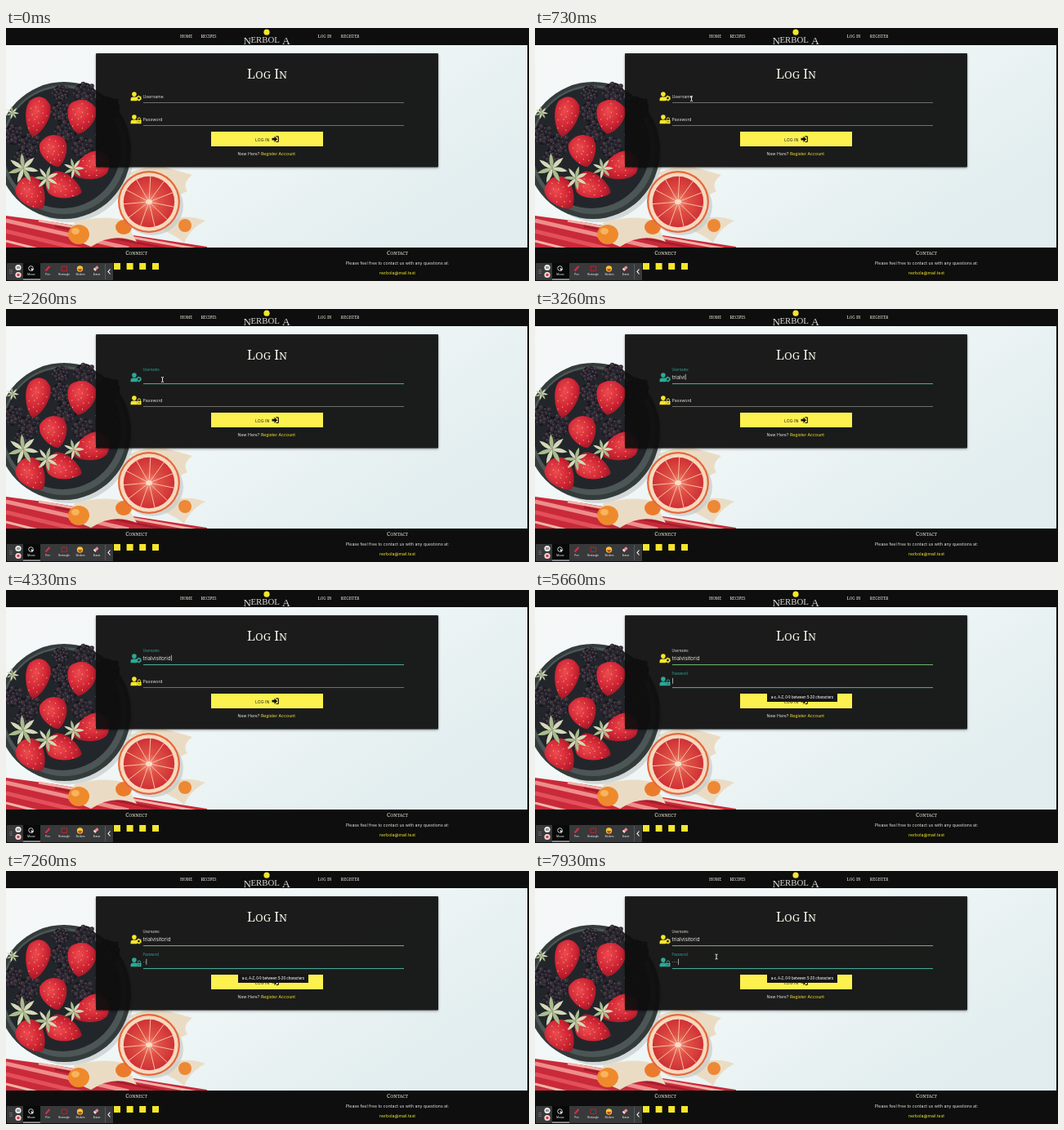
An HTML page that plays this animation: 640x310 px, repeating every 8 s.

```html
<!DOCTYPE html>
<html lang="en">
<head>
<meta charset="utf-8">
<title>Log In</title>
<style>
  html, body { margin: 0; width: 100%; height: 100%; overflow: hidden; background: #0d0e0d; }
  svg { display: block; width: 640px; height: 310px; }
  text { font: 5.2px Inter, sans-serif; fill: #e4e4e2; }
  .caps { font-family: "Noto Serif", serif; fill: #f4f2e6; }
  .logo { font-family: "Liberation Serif", serif; fill: #dcdcd8; }
  .yellow { fill: #f5e62c; }
  .tool { font: 3.1px Roboto, sans-serif; fill: #f2f2f2; }
  .mid { text-anchor: middle; }
</style>
</head>
<body>
<svg id="stage" viewBox="0 0 640 310">
  <defs>
    <linearGradient id="table" x2="1" y2=".6">
      <stop offset="0" stop-color="#f6f8f8"/><stop offset=".5" stop-color="#f0f6f6"/><stop offset="1" stop-color="#e1edef"/>
    </linearGradient>
    <radialGradient id="berryRed" cx=".4" cy=".35" r=".75">
      <stop offset="0" stop-color="#ed4b50"/><stop offset=".55" stop-color="#d02535"/><stop offset="1" stop-color="#8c1422"/>
    </radialGradient>
    <radialGradient id="flesh">
      <stop offset="0" stop-color="#f39a86"/><stop offset=".4" stop-color="#e05145"/><stop offset="1" stop-color="#cf3135"/>
    </radialGradient>
    <filter id="shadow" x="-5%" y="-5%" width="110%" height="115%">
      <feDropShadow dx="0" dy="1" stdDeviation="1.5" flood-opacity=".45"/>
    </filter>
    <clipPath id="photoArea"><path d="M0 21H638V269H0z"/></clipPath>
    <g id="person"><circle cx="4.4" cy="2.8" r="2.8"/><path d="M0 11V9.500Q0 6.300 3 6.300H6Q7 6.300 7.600 6.800V11z"/></g>
    <g id="cog">
      <circle cx="10" cy="7.800" r="2.100" fill="none" stroke="currentColor" stroke-width="1.500"/>
      <circle cx="10" cy="7.800" r="3" fill="none" stroke="currentColor" stroke-width="1" stroke-dasharray="1.570"/>
    </g>
    <g id="lock">
      <rect x="7.700" y="6.400" width="5.300" height="4.600" rx=".6"/>
      <path d="M8.800 6.500V5.200a1.600 1.600 0 0 1 3.200 0V6.500" fill="none" stroke="currentColor"/>
      <circle cx="10.350" cy="8.600" r=".7" fill="#20211f"/>
    </g>
  </defs>

  <g clip-path="url(#photoArea)">
    <rect y="21" width="640" height="248" fill="url(#table)"/>
    <g id="photo"></g>
  </g>
  <path d="M0 0H640V21H0zM0 269H640V310H0zM638.500 21H640V269H638.500z" fill="#0d0e0d"/>
  <rect x="110" y="31" width="419" height="139.500" rx="1" fill="#0c0d0b" fill-opacity=".9" filter="url(#shadow)"/>
  <g id="page"></g>

  <g id="fields"></g>
  <g id="tooltip">
    <rect x="284" y="126.500" width="86" height="10.500" fill="#161617"/>
    <text x="327" y="133.200" class="mid" style="font:4.700px Roboto,sans-serif;fill:#fff">a-z, A-Z, 0-9 between 5-20 characters</text>
  </g>
  <path id="pointer" d="M-1.500-3Q0-3 0-2V2Q0 3-1.500 3M1.500-3Q0-3 0-2M0 2Q0 3 1.500 3" fill="none" stroke="#fff" stroke-width=".9"/>
  <g id="toolbar"></g>
</svg>
<script>
const LOOP = 8000, FOCUS_NAME = 1400, FOCUS_PASS = 4500, TOOLTIP = 5000;
const TEAL = '#2fa896', YELLOW = '#f5e62c';
const $ = id => document.getElementById(id);
const clamp = v => Math.max(0, Math.min(1, v));
const ease = v => 1 - (1 - clamp(v)) ** 3;
const mix = (a, b, k) => a + (b - a) * k;

const ellipse = (x, y, rx, ry, fill, extra = '') =>
  `<ellipse cx="${x}" cy="${y}" rx="${rx}" ry="${ry}" fill="${fill}" ${extra}/>`;
const path = (d, fill, extra = '') => `<path d="${d}" fill="${fill}" ${extra}/>`;
const stroke = (d, color, width) => path(d, 'none', `stroke="${color}" stroke-width="${width}"`);
const text = (x, y, value, cls = '', size = 5.2) =>
  `<text x="${x}" y="${y}" class="${cls}" style="font-size:${size}px">${value}</text>`;

// Capitals with a larger initial on every word
function caps(x, y, value, size) {
  const words = value.split(' ').map(w =>
    `${w[0]}<tspan font-size="${size * .82}">${w.slice(1).toUpperCase()}</tspan>`);
  return text(x, y, words.join(' '), 'caps mid', size);
}

function strawberry(x, y, w, h, turn) {
  let seeds = '';
  for (let i = 0; i < 16; i++) {
    const a = i * 2.4, r = Math.sqrt(i / 16) * .8;
    seeds += ellipse((Math.cos(a) * r * w).toFixed(1), (Math.sin(a) * r * h).toFixed(1), .6, .9, '#f0a060');
  }
  const body = `M0 ${h}C${-w * .6} ${h * .8} ${-w * 1.2} ${-h * .2} ${-w * .8} ${-h * .7}` +
    `Q0 ${-h * 1.3} ${w * .8} ${-h * .7}C${w * 1.2} ${-h * .2} ${w * .6} ${h * .8} 0 ${h}z`;
  return `<g transform="translate(${x} ${y}) rotate(${turn})">${path(body, 'url(#berryRed)')}${seeds}</g>`;
}

function blackberry(x, y, r) {
  let out = ellipse(x, y, r, r, '#17161c');
  for (let i = 0; i < 19; i++) {
    const a = i * 2.4, d = Math.sqrt(i / 19) * r;
    const px = x + Math.cos(a) * d, py = y + Math.sin(a) * d;
    out += ellipse(px.toFixed(1), py.toFixed(1), r * .22, r * .22, i % 3 ? '#292630' : '#3a3038')
      + ellipse((px - .7).toFixed(1), (py - .8).toFixed(1), .6, .6, '#77717b');
  }
  return out;
}

function leaves(x, y, r, turn) {
  let out = '';
  for (let i = 0; i < 7; i++)
    out += path(`M0 0Q${r * .45} ${-r * .3} ${r} 0Q${r * .4} ${r * .25} 0 0`, i % 2 ? '#a9bc8c' : '#d3d9b8',
      `transform="rotate(${turn + i * 51})"`);
  return `<g transform="translate(${x} ${y})">${out}</g>`;
}

function grapefruit(x, y, r) {
  let out = ellipse(x, y, r, r, '#e5673c') + ellipse(x, y, r * .94, r * .94, '#f7d9bd')
    + ellipse(x, y, r * .82, r * .82, 'url(#flesh)');
  for (let i = 0; i < 11; i++) {
    const a = i * Math.PI * 2 / 11 + .2;
    out += stroke(`M${x} ${y}L${x + Math.cos(a) * r * .83} ${y + Math.sin(a) * r * .83}`, '#f6bfa6', 1);
  }
  return out + ellipse(x, y, 4, 3, '#f9dcc4');
}

function drawPhoto() {
  const husk = '#eadcc4';
  $('photo').innerHTML =
    path('M150 178Q180 165 200 172L228 180Q215 190 222 200L196 212z', husk)
    + path('M0 230L60 238L130 250L246 268V270H0z', '#c92a3a')
    + stroke('M0 236L150 270', '#ee8d8c', 5) + stroke('M0 249L95 272', '#e2505a', 5)
    + stroke('M0 261L40 271M40 236L235 271', '#f3b3a8', 3) + stroke('M60 243L200 271', '#a81d2c', 3)
    + ellipse(77, 154, 79, 84, '#c5ccca', 'opacity=".7"')
    + ellipse(71, 150, 82, 84, '#343b3b') + ellipse(71, 149, 77, 79, '#4d5656') + ellipse(69, 147, 72, 74, '#22262a')
    + [[67, 103, 12], [96, 80, 13], [125, 99, 14], [9, 131, 12], [29, 143, 13], [73, 127, 13], [94, 147, 13],
       [123, 131, 13], [22, 158, 11], [129, 148, 10], [67, 80, 10]].map(b => blackberry(...b)).join('')
    + [[38, 109, 16, 25, 12], [92, 109, 19, 21, 10], [59, 151, 18, 20, -15], [103, 170, 18, 24, 70],
       [32, 203, 18, 22, -35], [71, 194, 17, 23, -70]].map(s => strawberry(...s)).join('')
    + leaves(21, 172, 19, 10) + leaves(50, 184, 15, 30) + leaves(83, 172, 13, 0) + leaves(8, 104, 8, 5)
    + path('M84 238Q120 228 146 236L160 262Q130 250 104 268L76 256z', husk)
    + path('M186 246Q210 224 244 236Q225 246 218 263Q205 252 186 246z', husk)
    + ellipse(89, 253, 13, 12, '#ee8a2c') + ellipse(85, 249, 5, 4, '#f7b45c')
    + ellipse(144, 244, 10, 9, '#eb7b2c') + ellipse(219, 242, 8, 8, '#ed8836')
    + ellipse(179, 218, 38, 36, '#c8cccb', 'opacity=".7"') + grapefruit(175, 213, 38);
}

function drawPage() {
  const nav = [[220.500, 'Home'], [248, 'Recipes'], [390, 'Log In'], [421, 'Register']];
  $('page').innerHTML =
    nav.map(([x, label]) => caps(x, 12.3, label, 5.6)).join('')
    + ellipse(319, 5.2, 3.6, 3.6, YELLOW)
    + text(290.5, 19.5, 'N', 'logo', 13) + text(299.5, 18, 'ERBOL', 'logo', 10.8) + text(338, 19.500, 'A', 'logo', 13.5)
    + caps(319.5, 62, 'Log In', 16)
    + path('M251 127H388V145H251z', '#fdf150')
    + `<text x="305" y="139.200" style="fill:#242420">LOG IN</text>`
    + path('M325.500 134.800H328.500V132.500L332 136.200L328.500 139.900V137.600H325.500z', '#11110f')
    + stroke('M330.500 132.900H332.500Q333.300 132.900 333.300 133.700V138.700Q333.300 139.500 332.500 139.500H330.500', '#11110f', 1.2)
    + text(283.500, 155.800, 'New Here?') + text(312, 155.800, 'Register Account', 'yellow')
    + caps(159.5, 278, 'Connect', 6.7) + caps(479, 278, 'Contact', 6.7)
    + text(479, 289.800, 'Please feel free to contact us with any questions at:', 'mid')
    + text(479, 301.800, 'nerbola@mail.test', 'mid yellow')
    + [132, 147.6, 163.2, 179].map(x => path(`M${x} 288h8v8h-8z`, YELLOW)).join('');
}

function drawToolbar() {
  const labels = ['Mouse', 'Pen', 'Rectangle', 'Stickers', 'Eraser'];
  let dots = '';
  for (let i = 0; i < 6; i++) dots += ellipse(5 + i % 2 * 2, 296.5 + (i >> 1) * 2, .5, .5, '#aaa');
  $('toolbar').innerHTML =
    path('M2 288H131V309H2Q1 309 1 308V289Q1 288 2 288z', '#38393b') + dots
    + ellipse(15, 293.5, 3.6, 3.6, '#f2f2f2') + stroke('M14 292V295M16 292V295', '#333', .9)
    + ellipse(15, 302.5, 3.6, 3.6, '#f0dada') + path('M13.500 301h3v3h-3z', '#d83242')
    + path('M21 288H42V308H21z', '#080909') + path('M21 307.500H42V308.500H21z', '#e5e5e5')
    + labels.map((label, i) => text(31 + i * 20, 303.3, label, 'tool mid', 3.1)).join('')
    + `<circle cx="30.500" cy="294.500" r="2.800" fill="none" stroke="#fff" stroke-width=".8"/>`
    + path('M30.500 294L34.500 296L32.700 296.500L32 298.500z', '#fff')
    + stroke('M48.500 297.500L53.500 292', '#d62e43', 2.3)
    + stroke('M68 292H74.500V297.500H68z', '#b62232', 1)
    + ellipse(90.5, 295, 3.7, 3.7, '#f4c52e') + path('M88 295H93Q92.500 298 90.500 298T88 295', '#c14a28')
    + stroke('M108 296.500L112.500 292.500', '#e88f94', 3.2) + stroke('M108 296.500L109.300 295.300', '#f4e4e0', 3.2)
    + stroke('M121.500 289V308', '#66686a', .7) + stroke('M127.500 295.500L125 298.500L127.500 301.500', '#fff', 1.1);
}

function makeField(label, top, badge) {
  const group = document.createElementNS('http://www.w3.org/2000/svg', 'g');
  group.innerHTML =
    `<g transform="translate(152.500 ${top})"><use href="#person"/><use href="#${badge}"/></g>
     <text>${label}</text>
     <text x="167.500" y="${top + 7.5}" style="font-size:6.200px"></text>
     <rect x="168" y="${top + 12.8}" width="319"/>
     <rect y="${top + 1.5}" width=".6" height="7" fill="#fff"/>`;
  $('fields').append(group);
  const [icon, caption, value, line, caret] = group.children;

  return ({ focused, filled, raised, content, caretOn }) => {
    icon.style.fill = icon.style.color = focused ? TEAL : YELLOW;
    caption.setAttribute('transform', `translate(167.500 ${top + mix(7.6, -2.5, raised)}) scale(${mix(1, .8, raised)})`);
    caption.style.fill = focused ? TEAL : '#dededb';
    value.textContent = content;
    line.setAttribute('fill', focused ? '#4bb5a2' : filled ? '#72ba70' : '#92938f');
    line.setAttribute('height', focused || filled ? 1 : .7);
    caret.setAttribute('x', 168 + (content ? value.getComputedTextLength() : 0));
    caret.style.display = focused && caretOn ? '' : 'none';
  };
}

drawPhoto();
drawPage();
drawToolbar();
const nameField = makeField('Username', 78.3, 'cog');
const passField = makeField('Password', 106.3, 'lock');

const typed = (word, t, start, step) => word.slice(0, Math.max(0, Math.floor((t - start) / step) + 1));
const blink = (t, since) => (t - since) % 1000 < 500;

function movePointer(t) {
  const arriving = t >= 460 && t < 2450, leaving = t >= 7650;
  const k = ease((t - (leaving ? 7650 : 460)) / 250);
  const x = leaving ? mix(191, 222, k) : mix(215, 191.5, k);
  const y = leaving ? mix(86, 105, k) : mix(103, 86.5, k);
  $('pointer').setAttribute('transform', `translate(${x} ${y})`);
  $('pointer').style.display = arriving || leaving ? '' : 'none';
}

function draw() {
  const t = performance.now() % LOOP;
  const inPass = t >= FOCUS_PASS;
  nameField({
    focused: t >= FOCUS_NAME && !inPass,
    filled: inPass,
    raised: ease((t - FOCUS_NAME) / 200),
    content: typed('trialvisitorid', t, 2500, 115),
    caretOn: t > 2500 && t < 4495 || blink(t, FOCUS_NAME),
  });
  passField({
    focused: inPass,
    filled: false,
    raised: ease((t - FOCUS_PASS) / 200),
    content: typed('····', t, 6950, 190),
    caretOn: t > 6950 || blink(t, FOCUS_PASS),
  });
  $('tooltip').style.display = t >= TOOLTIP ? '' : 'none';
  movePointer(t);
  requestAnimationFrame(draw);
}
draw();
</script>
</body>
</html>
```
